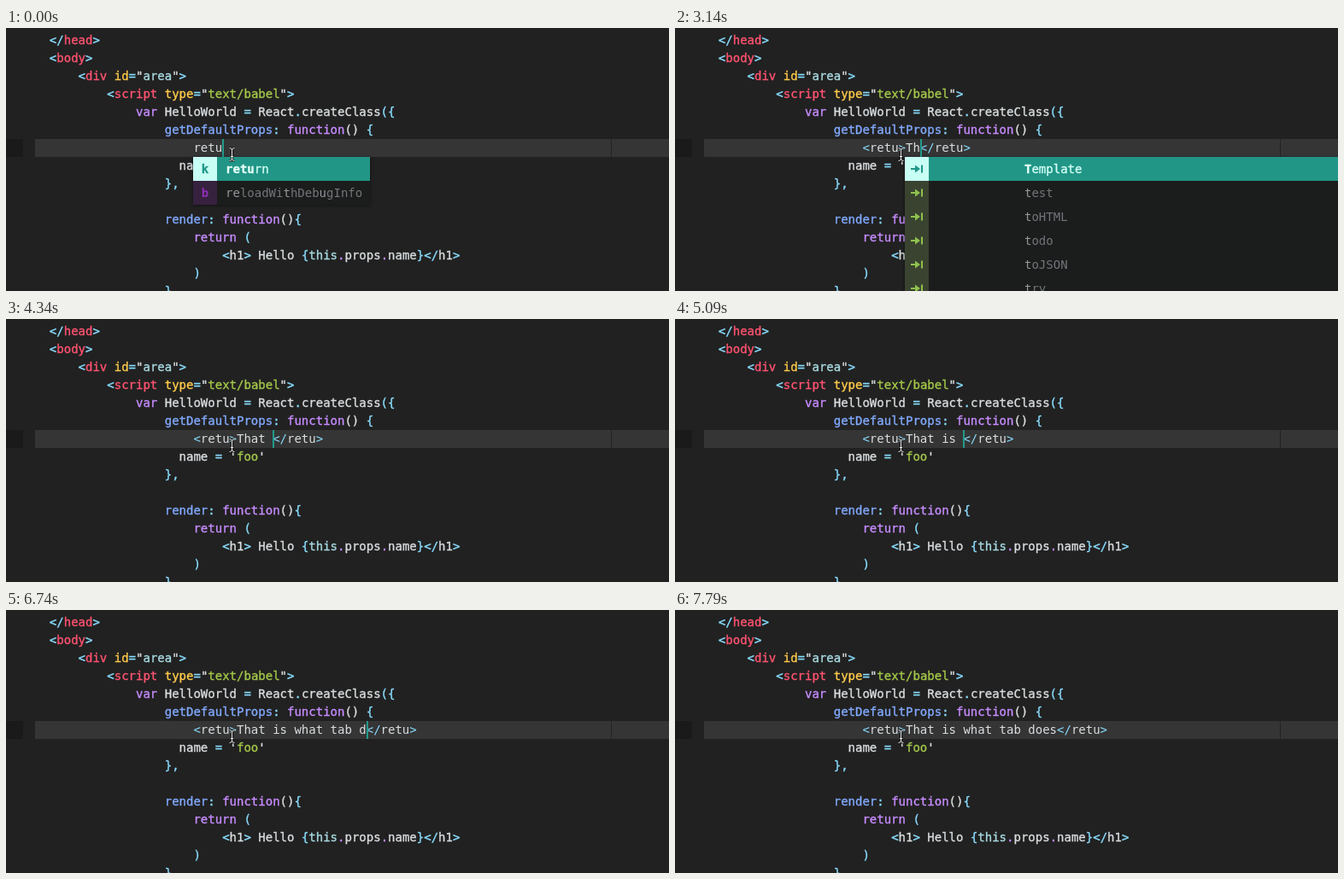
An HTML page that plays this animation: 776x308 px, repeating every 8000 ms.

```html
<!DOCTYPE html>
<html lang="en">
<head>
<meta charset="utf-8">
<title>Editor autocomplete</title>
<style>
  html, body { margin: 0; width: 100%; height: 100%; overflow: hidden; background: #212121; }
  #stage {
    position: relative; width: 776px; height: 308px; overflow: hidden;
    font: 14px/21px "DejaVu Sans Mono", "Liberation Mono", monospace;
    color: #d9dde0;
  }
  #stage div, #stage svg { position: absolute; white-space: pre; }
  #stage .gutter { left: 0; top: 130px; width: 20px; height: 21px; background: #1a1a1a; }
  #stage .active { left: 34px; top: 130px; width: 742px; height: 21px; background: #353535; }
  #stage .guide { left: 708px; top: 130px; width: 1px; height: 21px; background: #222; }
  #code { left: 0; top: 0; -webkit-text-stroke: .35px; }
  .c { color: #89ddff; }
  .r { color: #ff5370; }
  .y { color: #ffcb4b; }
  .g { color: #a5c84a; }
  .p { color: #c78cff; }
  .b { color: #82aaff; }
  .s { color: #a9dbe2; }
  #caret { top: 130px; width: 2px; height: 21px; background: #229a8b; }
  #popup { top: 151px; background: #1b1c1c; box-shadow: 0 1px 4px rgba(0, 0, 0, .45); line-height: 28px; }
  #popup .row { left: 0; width: 100%; height: 28px; color: #71767a; }
  #popup .row b { color: #92989c; font-weight: normal; }
  #popup .icon { left: 0; width: 28px; height: 28px; text-align: center; font-weight: bold; color: #8fc14d; background: #3a4330; }
  #popup .icon.value { color: #8e2fb5; background: #36213f; }
  #popup .icon svg { left: 7px; top: 8px; }
  #popup .row:first-child { background: #219686; color: #d3fff6; -webkit-text-stroke: .35px; }
  #popup .row:first-child b { color: #e6fffa; font-weight: bold; }
  #popup .row:first-child .icon { background: #c8fff4; color: #219686; }
</style>
</head>
<body>
<div id="stage">
  <div class="gutter"></div>
  <div class="active"></div>
  <div class="guide"></div>
  <div id="code"></div>
  <div id="typed"></div>
  <div id="caret"></div>
  <div id="popup"></div>
  <svg style="left:259px;top:139px" width="11" height="18" fill="none">
    <defs><path id="beam" d="M2.5 1.5Q5.5 1.5 5.5 4V14Q5.5 16.5 2.5 16.5M8.5 1.5Q5.5 1.5 5.5 4M5.5 14Q5.5 16.5 8.5 16.5M4 11.5H7"/></defs>
    <use href="#beam" stroke="#111" stroke-width="2.6"/>
    <use href="#beam" stroke="#eee"/>
  </svg>
</div>
<script>
const LOOP = 8000, LEFT = 34, CHAR = 8.428, LINE = 21, TOP = 4;
const $ = id => document.getElementById(id);
const colX = col => LEFT + col * CHAR;
const esc = s => s.replace(/&/g, '&amp;').replace(/</g, '&lt;');

// Each token starts with its colour class; "w" is the default text colour.
const paint = tokens => tokens.map(t => `<span class="${t[0]}">${esc(t.slice(1))}</span>`).join('');

// row, column, tokens
const code = [
  [0, 2, 'c</', 'rhead', 'c>'],
  [1, 2, 'c<', 'rbody', 'c>'],
  [2, 6, 'c<', 'rdiv ', 'yid', 'c=', 'w"', 'sarea', 'w"', 'c>'],
  [3, 10, 'c<', 'rscript ', 'ytype', 'c=', 'w"', 'gtext/babel', 'w"', 'c>'],
  [4, 14, 'pvar', 'w HelloWorld ', 'c=', 'w React', 'c.', 'wcreateClass', 'c({'],
  [5, 18, 'bgetDefaultProps', 'c: ', 'pfunction', 'w() ', 'c{'],
  [7, 20, 'wname ', 'c= ', "w'", 'gfoo', "w'"],
  [8, 18, 'c},'],
  [10, 18, 'brender', 'c: ', 'pfunction', 'w()', 'c{'],
  [11, 22, 'preturn', 'c ('],
  [12, 26, 'c<', 'wh1', 'c>', 'w Hello ', 'c{', 'sthis', 'p.', 'wprops', 'p.', 'wname', 'c}</', 'wh1', 'c>'],
  [13, 22, 'c)'],
  [14, 18, 'c}']
];
$('code').innerHTML = code.map(([row, col, ...tokens]) =>
  `<div style="left:${colX(col)}px;top:${TOP + row * LINE}px">${paint(tokens)}</div>`).join('');

const arrow = '<svg width="15" height="12"><path d="M0 5H5V1.5L11 6L5 10.5V7H0ZM12 1.5H14V10.5H12Z" fill="currentColor"/></svg>';
const list = (col, width, indent, match, words) => ({ col, width, indent, match, words: words.split(' ') });
const popups = {
  retu: list(22, 207, 38, 'retu', 'return reloadWithDebugInfo'),
  T: list(28, 600, 140, 't', 'Template test toHTML todo toJSON try'),
  That: list(28, 308, 128, 'that', 'that this then throw toHTML'),
  i: list(33, 600, 128, 'i', 'if import input img iframe interval'),
  w: list(36, 600, 128, 'w', 'while with write warn wbr window'),
  t: list(41, 600, 128, 't', 'test toHTML todo toJSON try timeout'),
  d: list(45, 270, 128, 'd', 'div do data default delete debugger')
};

function mark(word, match) {
  let i = 0;
  return [...word].map(ch => ch.toLowerCase() === match[i] ? (i++, `<b>${ch}</b>`) : ch).join('');
}

function rowHtml(list, word, i) {
  const letters = list === popups.retu;
  const icon = letters ? 'kb'[i] : arrow;
  return `<div class="row" style="top:${i * 28}px">` +
    `<div class="icon${letters ? ' value' : ''}">${icon}</div>` +
    `<div style="left:${list.indent}px">${mark(word, list.match)}</div></div>`;
}

// time, text inside the tag (null before the tag expands), popup, caret hidden
const steps = [
  [0, null, 'retu'], [450, null, 'retu', 1], [740, null, 'retu'], [1190, null, 'retu', 1],
  [1490, ''], [1940, '', '', 1], [2390, ''],
  [2840, 'T'], [2990, 'T', 'T'], [3140, 'Th', 'T'], [3290, 'Th'], [3740, 'Th', '', 1],
  [4040, 'Tha'], [4190, 'That', 'That'], [4340, 'That '],
  [4790, 'That i', 'i'], [4940, 'That is', 'i'], [5090, 'That is '],
  [5240, 'That is w'], [5390, 'That is wh', 'w'], [5540, 'That is wha'], [5690, 'That is what'],
  [5840, 'That is what '], [5990, 'That is what t'], [6140, 'That is what t', 't'],
  [6290, 'That is what ta', 't'], [6440, 'That is what tab'], [6590, 'That is what tab '],
  [6740, 'That is what tab d'], [6890, 'That is what tab d', 'd'], [7040, 'That is what tab do', 'd'],
  [7190, 'That is what tab doe'], [7340, 'That is what tab does'], [7790, 'That is what tab does', '', 1]
];

$('typed').style.cssText = `left:${colX(22)}px;top:${TOP + 6 * LINE}px`;

function show([, text, popup, hidden]) {
  const open = text === null;
  $('typed').innerHTML = paint(open ? ['wretu']
    : ['c<', 'wretu', 'c>', 'w' + text, 'c</', 'wretu', 'c>']);
  const caret = $('caret').style;
  caret.left = Math.round(colX(open ? 26 : 28 + text.length)) + 'px';
  caret.visibility = hidden ? 'hidden' : 'visible';

  const list = popups[popup], box = $('popup');
  box.style.display = list ? 'block' : 'none';
  if (!list) return;
  box.style.left = Math.floor(colX(list.col)) + 'px';
  box.style.width = list.width + 'px';
  box.style.height = list.words.length * 28 + 'px';
  box.innerHTML = list.words.map((word, i) => rowHtml(list, word, i)).join('');
}

let shown;
function frame() {
  const t = performance.now() % LOOP;
  const step = steps.findLast(s => s[0] <= t);
  if (step !== shown) show(shown = step);
  requestAnimationFrame(frame);
}
frame();
</script>
</body>
</html>
```
